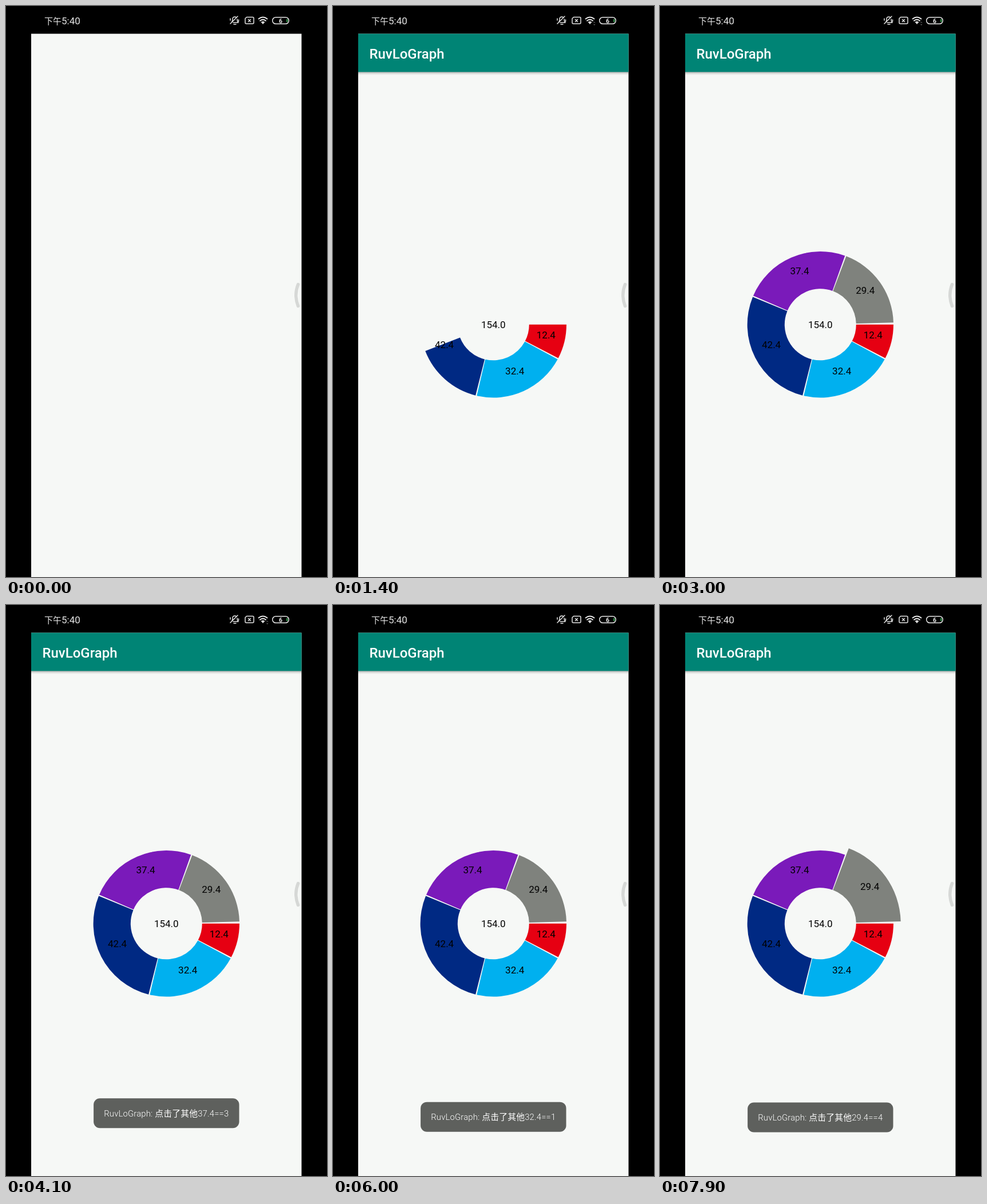
Animation of 561 by 998 pixels, one loop 8 s. Source, as an HTML page:

```html
<!DOCTYPE html>
<html lang="zh">
<head>
<meta charset="utf-8">
<title>Ring chart</title>
<style>
  html, body { margin: 0; width: 100%; height: 100%; overflow: hidden; background: #000; }
  svg { display: block; width: 100%; height: 100%; }
  text { font-family: Roboto, "Noto Sans CJK SC", "Noto Sans CJK", sans-serif; }
  .value { font-size: 17px; text-anchor: middle; fill: #000; }
  .toast text { font-size: 14.8px; font-weight: 300; letter-spacing: .2px; text-anchor: middle; fill: #fff; }
  .icon { fill: none; stroke: #e6e6e6; stroke-width: 1.5; stroke-linecap: round; stroke-linejoin: round; }
</style>
</head>
<body>
<svg id="stage" viewBox="0 0 561 998">
  <defs>
    <linearGradient id="shade" x2="0" y2="1">
      <stop offset="0" stop-color="#000" stop-opacity=".32"/>
      <stop offset=".5" stop-color="#000" stop-opacity=".1"/>
      <stop offset="1" stop-color="#000" stop-opacity="0"/>
    </linearGradient>
  </defs>
  <rect width="561" height="998"/>
  <rect x="44" y="48.5" width="472.5" height="950" fill="#f6f8f6"/>

  <g fill="#e6e6e6">
    <text x="67" y="32"><tspan font-size="15">下午</tspan><tspan font-size="17">5:40</tspan></text>
  </g>
  <g class="icon">
    <path d="M394 29q2-2 2-6q0-4 4-4q1.500 0 2.500 1M404 23q0 4 2 6H397M398 32h4M392 31L405 18M392 22v3M406.500 24v3"/>
    <path d="M420.500 19.500H431q2 0 2 2V29q0 2-2 2H420q-2 0-2-2V22zM423.500 23.500l4 4m0-4l-4 4"/>
    <path stroke-width="2" d="M441.500 22.500q7.500-6 15 0M444 25.700q5-4 10 0M446.800 28.500q2.200-1.600 4.400 0"/>
    <rect x="465.700" y="19.700" width="28.600" height="11.600" rx="5.800"/>
  </g>
  <circle cx="449" cy="30" r="1.500" fill="#e6e6e6"/>
  <text x="480" y="29.500" font-size="10.500" font-weight="700" text-anchor="middle" fill="#eee">6</text>
  <path d="M491.300 23v5" stroke="#3fae5a" stroke-width="2"/>
  <path id="traffic" d="M455.500 29.500l1.200-1.200 1.200 1.200M455.500 32l1.200 1.200 1.200-1.200" fill="none" stroke="#aaa" stroke-width=".9"/>

  <g id="screen">
    <rect x="44" y="115" width="472.500" height="6" fill="url(#shade)"/>
    <rect x="44" y="48.500" width="472.500" height="66.800" fill="#008475"/>
    <text x="63.500" y="91.500" font-size="24" font-weight="500" fill="#fff">RuvLoGraph</text>
    <g id="chart"></g>
    <text class="value" x="280.300" y="563">154.0</text>
  </g>
  <path d="M510.500 486.500Q503 505 510.500 524.500" fill="none" stroke="#d6d8d6" stroke-width="5.500" stroke-linecap="round"/>
  <g id="toasts"></g>
</svg>
<script>
const LOOP = 8000, CX = 280.3, CY = 556.8, INNER = 62.5, OUTER = 127.7, GROW = 1.1;
const SWEEP_START = 13, SWEEP_TIME = 3000;
const $ = id => document.getElementById(id);

function add(parent, tag, attrs = {}, label = '') {
  const el = document.createElementNS('http://www.w3.org/2000/svg', tag);
  for (const k in attrs) el.setAttribute(k, attrs[k]);
  el.textContent = label;
  parent.appendChild(el);
  return el;
}

const polar = (r, deg) => {
  const a = deg * Math.PI / 180;
  return [CX + r * Math.cos(a), CY + r * Math.sin(a)];
};
const xy = (r, deg) => polar(r, deg).map(n => n.toFixed(2)).join(' ');

// value, colour, press start and end
const data = [
  [12.4, '#e60012'],
  [32.4, '#00b0ef', 5600, 5800],
  [42.4, '#002983'],
  [37.4, '#7a1aba', 3800, 4000],
  [29.4, '#7f827d', 7200, LOOP]
];
const total = data.reduce((sum, d) => sum + d[0], 0);
let angle = 0;
const slices = data.map(([value, fill, down = Infinity, up = 0]) => {
  const start = angle, span = value / total * 360;
  angle += span;
  return {
    from: Math.max(0, start - 0.6), to: angle - 1.6, mid: start + span / 2, down, up,
    path: add($('chart'), 'path', { fill })
  };
});
slices.forEach((s, i) => s.text = add($('chart'), 'text', { class: 'value' }, data[i][0].toFixed(1)));

function drawSlice(s, sweep, t) {
  const end = Math.min(s.to, sweep), shown = end > s.from;
  s.path.style.display = s.text.style.display = shown ? '' : 'none';
  if (!shown) return;
  const scale = t >= s.down && t < s.up ? GROW : 1, r = OUTER * scale;
  s.path.setAttribute('d',
    `M${xy(INNER, s.from)}L${xy(r, s.from)}A${r} ${r} 0 0 1 ${xy(r, end)}` +
    `L${xy(INNER, end)}A${INNER} ${INNER} 0 0 0 ${xy(INNER, s.from)}Z`);
  const [x, y] = polar((INNER + OUTER) / 2 * scale, s.mid);
  s.text.setAttribute('x', x);
  s.text.setAttribute('y', y);
}

// later toasts lie below earlier ones
const toasts = [[7185, '29.4==4'], [5650, '32.4==1'], [3860, '37.4==3']].map(([start, note], i, all) => {
  const box = add($('toasts'), 'g', { class: 'toast' });
  add(box, 'rect', { x: -127.2, y: -26, width: 254.4, height: 52, rx: 11, fill: '#5e605d' });
  add(box, 'text', { y: 5.5 }, 'RuvLoGraph: 点击了其他' + note);
  return { box, start, end: i ? all[i - 1][0] : Infinity };
});

function spring(u) {
  const w = Math.PI / 225, tau = 130;
  return 43 * Math.exp(-u / tau) * (Math.cos(w * u) + Math.sin(w * u) / (w * tau));
}
const clamp = n => Math.min(1, Math.max(0, n));

function drawToast({ box, start, end }, t) {
  const u = t - start, out = clamp((t - end) / 100);
  const alpha = u < 0 ? 0 : clamp(u / 150) ** 1.4 * (1 - out);
  box.style.display = alpha ? '' : 'none';
  if (!alpha) return;
  box.setAttribute('opacity', alpha);
  box.setAttribute('transform', `translate(${CX} ${895.7 + spring(u)}) scale(${1 - out * 0.06})`);
}

function draw(now) {
  const t = now % LOOP;
  $('screen').style.display = t < 100 ? 'none' : '';
  $('traffic').style.display = t >= 1000 && t < 5000 ? '' : 'none';
  const f = clamp((t - SWEEP_START) / SWEEP_TIME);
  const sweep = 180 * (1 - Math.cos(f * Math.PI));
  slices.forEach(s => drawSlice(s, sweep, t));
  toasts.forEach(b => drawToast(b, t));
}

let origin;
function tick(now) {
  origin ??= now;
  draw(now - origin);
  requestAnimationFrame(tick);
}
draw(0);
requestAnimationFrame(tick);
</script>
</body>
</html>
```
